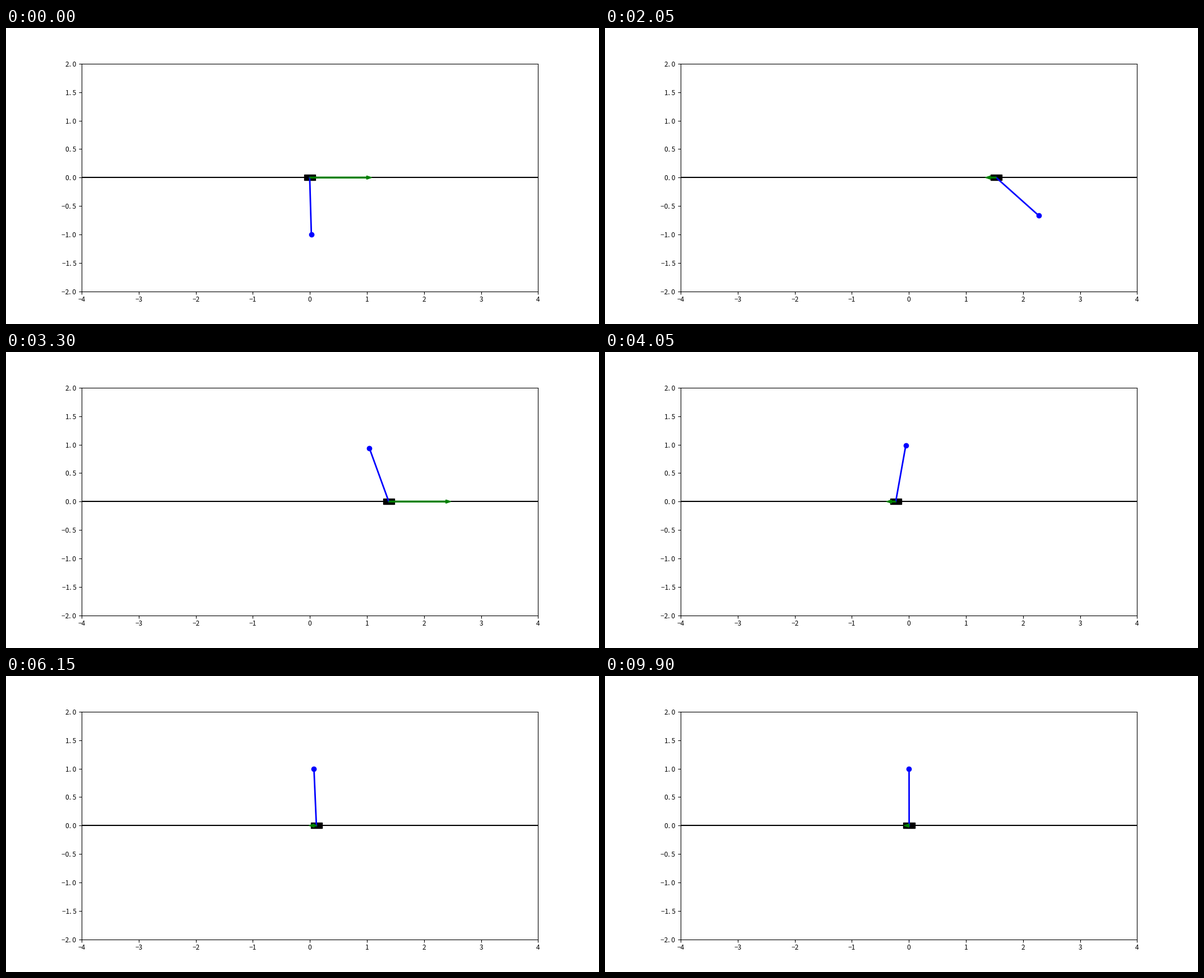
These frames come from a looping animation (1058 px wide and 529 px high, 10 s). A matplotlib script:

```python
import matplotlib.pyplot as plt
import numpy as np
from matplotlib.animation import FuncAnimation
from matplotlib.patches import Rectangle

DT, FRAMES = 0.05, 200
TIMES = np.arange(FRAMES + 10) * DT
GRAVITY, CART_MASS, BOB_MASS, MAX_FORCE = 9.81, 1.0, 0.2, 15.0

# Swing-up: time, cart position, pole angle in degrees (0 hangs down)
SWING = np.array([
    (0.00, 0.00, 0),
    (1.00, 3.05, -108),
    (2.05, 1.497, 45.3),
    (2.30, 1.30, 48),
    (2.87, 2.16, -90),
    (3.15, 1.68, -146.6),
    (3.30, 1.39, -160.6),
])

# Balancing: a damped oscillation about the upright pole
SETTLE_START, SETTLE_X = 4.4, -0.62
DECAY, FREQUENCY = 0.92, 1.717


def settle(t):
    """Cart position and pole angle of the linear closed-loop mode."""
    mode = complex(-DECAY, FREQUENCY)
    start = SETTLE_X * complex(1, -DECAY / FREQUENCY)
    x = start * np.exp(mode * (t - SETTLE_START))
    lean = mode**2 / (GRAVITY - mode**2) * x
    return x.real, -np.pi - lean.real


def derivatives(q):
    padded = np.concatenate(([q[1]], q, [q[-2]]))
    speed = (padded[2:] - padded[:-2]) / (2 * DT)
    accel = (padded[2:] - 2 * q + padded[:-2]) / DT**2
    return speed, accel


def cart_force(x, theta):
    _, x_acc = derivatives(x)
    spin, _ = derivatives(theta)
    s, c = np.sin(theta), np.cos(theta)
    return ((CART_MASS + BOB_MASS * s**2) * x_acc
            - BOB_MASS * s * (spin**2 + GRAVITY * c))


late = TIMES[TIMES > SETTLE_START - DT / 2]
late_x, late_theta = settle(late)
goal_time = np.concatenate((SWING[:, 0], late))
goal_x = np.concatenate((SWING[:, 1], late_x))
goal_theta = np.concatenate((np.radians(SWING[:, 2]), late_theta))
goal_index = np.rint(goal_time / DT).astype(int)


def residuals(state):
    x, theta = state.reshape(2, -1)
    _, x_acc = derivatives(x)
    _, theta_acc = derivatives(theta)
    force = cart_force(x, theta)
    swing = theta_acc + x_acc * np.cos(theta) + GRAVITY * np.sin(theta)
    return np.concatenate((
        2 * swing,
        np.maximum(np.abs(force) - MAX_FORCE, 0),
        0.005 * force,
        0.01 * np.diff(force),
        50 * (x[goal_index] - goal_x),
        50 * (theta[goal_index] - goal_theta),
        2 * (force[:1] - MAX_FORCE),
    ))


def solve_motion(steps=45, eps=1e-6):
    """Levenberg-Marquardt fit of a cart-pole motion through the goals."""
    state = np.concatenate((np.interp(TIMES, goal_time, goal_x),
                            np.interp(TIMES, goal_time, goal_theta)))
    damping, error = 1e-2, residuals(state)
    for _ in range(steps):
        jac = np.empty((error.size, state.size))
        for j in range(state.size):
            moved = state.copy()
            moved[j] += eps
            jac[:, j] = (residuals(moved) - error) / eps
        normal, slope = jac.T @ jac, jac.T @ error
        for _ in range(6):
            damped = normal + damping * np.diag(np.diag(normal))
            trial = state - np.linalg.solve(damped, slope)
            trial_error = residuals(trial)
            if trial_error @ trial_error < error @ error:
                state, error = trial, trial_error
                damping = max(damping / 5, 1e-9)
                break
            damping *= 4
    return state.reshape(2, -1)


cart_x, pole_angle = solve_motion()
force = np.clip(cart_force(cart_x, pole_angle), -MAX_FORCE, MAX_FORCE)

plt.rcParams.update({"font.family": "Noto Sans CJK JP", "font.size": 8.6})
fig, ax = plt.subplots(figsize=(10.58, 5.29), dpi=100)
fig.subplots_adjust(top=0.8795)
ax.set(xlim=(-4, 4), ylim=(-2, 2), aspect="equal")
ax.tick_params(axis="x", pad=2.4)
ax.yaxis.set_major_formatter(
    lambda v, _: f"{v:.1f}".replace("-", "\u2212").replace(".", ". "))

ax.hlines(0, -4, 4, colors="black", linewidth=1.5)
cart = ax.add_patch(Rectangle((-0.1, -0.05), 0.2, 0.1, color="black"))
pole, = ax.plot([], [], color="blue", linewidth=2)
bob, = ax.plot([], [], "o", color="blue", markersize=6)
arrow = ax.arrow(0, 0, 1, 0, width=0.02, color="green", zorder=3)


def update(frame):
    k = min(frame, FRAMES - 2)
    x, theta = cart_x[k], pole_angle[k]
    bob_x, bob_y = x + np.sin(theta), -np.cos(theta)
    cart.set_x(x - 0.1)
    pole.set_data([x, bob_x], [0, bob_y])
    bob.set_data([bob_x], [bob_y])
    arrow.set_data(x=x, y=0, dx=force[k] / MAX_FORCE, dy=0)
    return cart, pole, bob, arrow


anim = FuncAnimation(fig, update, frames=FRAMES, interval=50, repeat=True)
plt.show()
```
